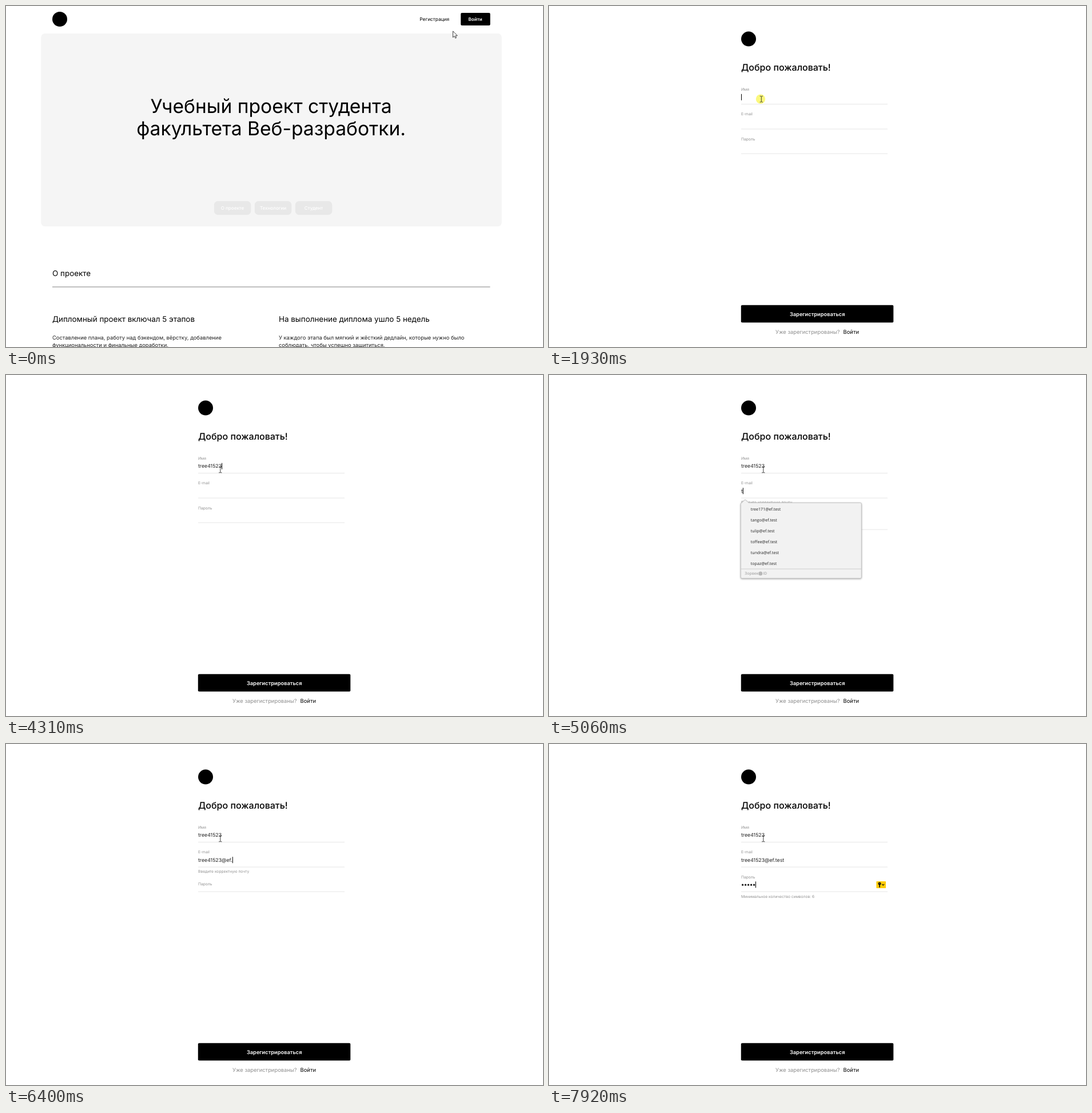
An HTML page that plays this animation: 939 px wide and 596 px high, repeating every 8000 ms.

```html
<!DOCTYPE html>
<html lang="ru">
<head>
<meta charset="utf-8">
<title>Регистрация</title>
<style>
html, body { margin: 0; width: 100%; height: 100%; overflow: hidden; background: #fff; }
svg { display: block; width: 939px; height: 596px; }
text { font-family: Inter, sans-serif; font-optical-sizing: none; text-rendering: geometricPrecision; white-space: pre; }
.mid { text-anchor: middle; }
.hero { font-size: 33.6px; }
.head { font-size: 13.43px; }
.body { font-size: 9.4px; fill: #222; }
.nav { font-size: 8.06px; font-weight: 500; }
.link { font-size: 8.3px; }
.title { font-size: 16px; font-weight: 500; }
.label { font-size: 6.7px; fill: #919191; }
.value { font-size: 8.73px; fill: #222; }
.action { font-size: 9.25px; font-weight: 600; }
.note { font-size: 9.4px; }
.menu { font: 7.1px "Open Sans", "Noto Sans", sans-serif; fill: #222; }
.brand { font: 600 6.7px "Open Sans", "Noto Sans", sans-serif; fill: #ababab; }
</style>
</head>
<body>
<svg id="stage" viewBox="0 0 939 596"></svg>
<script>
const stage = document.getElementById('stage');
const LOOP = 8000;
const NAME = 'tree41523';
const EMAIL = 'tree41523@ef.test';

const rect = (x, y, w, h, fill, r = 0, extra = '') =>
  `<rect x="${x}" y="${y}" width="${w}" height="${h}" rx="${r}" fill="${fill}" ${extra}/>`;
const text = (x, y, cls, str, extra = '') =>
  `<text x="${x}" y="${y}" class="${cls}" ${extra}>${str}</text>`;
const circle = (x, y, r, fill) => `<circle cx="${x}" cy="${y}" r="${r}" fill="${fill}"/>`;

function tab(x, label) {
  return rect(x, 341, 64.5, 24, '#e8e8e8', 6.5) +
    text(x + 32.2, 356, 'nav mid', label, 'fill="#fff"');
}

function column(x, head, lines) {
  return text(x, 552, 'head', head) +
    lines.map((line, i) => text(x, 582.6 + i * 13.4, 'body', line)).join('');
}

const home = `<g id="home">
  ${circle(94, 23, 13, '#000')}
  ${text(749.2, 25.6, 'link mid', 'Регистрация')}
  ${rect(795.2, 11.9, 51.5, 22, '#000', 2)}
  ${text(820.6, 25.6, 'nav mid', 'Войти', 'fill="#fff" font-weight="600" style="font-weight:600"')}
  ${rect(61.3, 48, 805.5, 337.3, '#f5f5f5', 6.7)}
  ${text(463.6, 187, 'hero mid', 'Учебный проект студента')}
  ${text(463.6, 226, 'hero mid', 'факультета Веб-разработки.')}
  ${tab(363.8, 'О проекте')}${tab(434.8, 'Технологии')}${tab(505.8, 'Студент')}
  ${text(81, 472, 'head', 'О проекте')}
  ${rect(81, 490.5, 765.5, 1, '#808080')}
  ${column(81, 'Дипломный проект включал 5 этапов', [
    'Составление плана, работу над бэкендом, вёрстку, добавление',
    'функциональности и финальные доработки.'])}
  ${column(477, 'На выполнение диплома ушло 5 недель', [
    'У каждого этапа был мягкий и жёсткий дедлайн, которые нужно было',
    'соблюдать, чтобы успешно защититься.'])}
</g>`;

const form = `<g id="form">
  ${circle(349, 57.6, 13, '#000')}
  ${text(336, 113, 'title', 'Добро пожаловать!')}
  ${text(336, 148.4, 'label', 'Имя')}
  ${text(336, 191.4, 'label', 'E-mail', 'id="emailLabel"')}
  ${text(336, 235, 'label', 'Пароль', 'id="passLabel"')}
  ${[171, 214.5, 257.6].map((y, i) => rect(336, y, 256, 1, '#e6e6e6', 0, `id="line${i}"`)).join('')}
  ${text(336, 162.4, 'value', '', 'id="name"')}
  ${text(336, 206, 'value', '', 'id="email"')}
  <g id="dots"></g>
  ${text(336, 0, 'label', '', 'id="error"')}
  ${rect(336, 0, 1, 11, '#000', 0, 'id="caret"')}
  <g id="key">
    ${rect(572.4, 240, 16.6, 12, '#fc0', .8)}
    ${circle(578, 244, 2.5, '#111')}${rect(577.2, 245, 1.7, 5.6, '#111')}${circle(578, 243.3, .6, '#fc0')}
    <path d="M582.2 244.9l2 2 2-2" fill="none" stroke="#111" stroke-width="1.1"/>
  </g>
  <g id="menu"></g>
  ${rect(335.8, 522.7, 266.5, 30.6, '#000', 2)}
  ${text(469.2, 541.5, 'action mid', 'Зарегистрироваться', 'fill="#fff"')}
  ${text(396, 573.3, 'note', 'Уже зарегистрированы?', 'fill="#8f8f8f"')}
  ${text(514.6, 573.3, 'note', 'Войти')}
</g>`;

const cursors = `<g id="halo">${circle(0, 0, 8.2, '#fbf87d')}</g>
<g id="pointer" fill="#fff" stroke="#111" stroke-width=".8" stroke-linejoin="round">
  <path id="arrow" d="M0 .4V11.4L2.6 9 4.3 12.8 6 12 4.4 8.4H7.8Z"/>
  <path id="hand" d="M-1 1Q0-.6 1 1V5L5.5 6Q6.5 6.4 6.4 8L5.4 13H-1L-4.4 8.4Q-4.2 7-2.8 7.6L-1 9Z"/>
  <path id="ibeam" fill="none" stroke-linejoin="miter" d="M-2.6-5H-.8L0-4.3.8-5H2.6M0-4.3V4.6M-2.6 5.3H-.8L0 4.6.8 5.3H2.6"/>
</g>`;

stage.innerHTML = home + form + cursors;
const ui = {};
stage.querySelectorAll('[id]').forEach(node => ui[node.id] = node);

const show = (node, on) => node.setAttribute('visibility', on ? 'visible' : 'hidden');
const place = (node, x, y) => node.setAttribute('transform', `translate(${x} ${y})`);
const between = (t, a, b) => t >= a && t < b;
const countPast = (times, t) => times.filter(v => t >= v).length;

// Rounded drop-down with a small tip; rows sit above the service footer.
function popup(x, y, width, tip, rows) {
  const divider = y + 20.3 + (rows.length - 1) * 19;
  const bottom = divider + 16.7;
  const right = x + width;
  const shape = `M${x + 2} ${y}H${tip - 6}L${tip} ${y - 5.5}L${tip + 6} ${y}H${right - 2}q2 0 2 2` +
    `V${bottom - 2}q0 2-2 2H${x + 2}q-2 0-2-2V${y + 2}q0-2 2-2Z`;
  return `<path d="${shape}" fill="#f2f2f2" stroke="#b9b9b9" stroke-width=".8" style="filter:drop-shadow(0 1px 1.5px #0005)"/>` +
    rows.map((row, i) => text(x + 17.5, y + 13.4 + i * 19, 'menu', row)).join('') +
    rect(x, divider, width, .8, '#c4c4c4') +
    text(x + 7, divider + 10.8, 'brand', 'Зорвек') +
    circle(x + 34.5, divider + 8.4, 3.5, '#b8b8b8') +
    text(x + 39, divider + 10.8, 'brand', 'ID');
}

const suggestions = ['tree171@ef.test', 'tango@ef.test', 'tulip@ef.test', 'toffee@ef.test', 'tundra@ef.test', 'topaz@ef.test'];
const longMenu = popup(335.3, 223.3, 211, 343, suggestions);
const shortMenu = popup(335.3, 223.3, 211, 343, suggestions.slice(0, 1));
const saveMenu = y => popup(375.3, y, 215.3, 582, ['Сохранить в браузере']) +
  rect(379.6, y + 6.3, 9, 8.8, '#fc0', 1) +
  `<path d="M381.8 ${y + 10.6}l1.8 1.8 3-3.5" fill="none" stroke="#222" stroke-width="1.1"/>`;
const saveTop = saveMenu(267.3);
const saveLow = saveMenu(278.3);

const nameKeys = [2990, 3130, 3320, 3590, 3870, 3940, 4070, 4210, 4310];
const emailKeys = [4920, 5130, 5200, 5330, 5590, 5660, 5800, 5870, 5930, 6070, 6200, 6270, 6400, 6470, 6540, 6670, 6810];
const passKeys = [7260, 7520, 7650, 7790, 7920];

function menuAt(t) {
  if (between(t, 4990, 5330)) return longMenu;
  if (between(t, 5330, 5730)) return shortMenu;
  if (between(t, 7070, 7260)) return saveTop;
  if (between(t, 7260, 7590)) return saveLow;
  return '';
}

// [time, x, y] stops of the mouse
const path = [[0, 781.5, 43.5], [350, 749.6, 21.6], [770, 749.6, 21.6], [1120, 318, 190],
  [1190, 318, 190], [1470, 371.3, 162.6]];

function mouseAt(time) {
  if (time >= 2000) return [374.8, 165.4];
  const t = Math.floor(time / 70) * 70;
  const i = path.findIndex(stop => stop[0] > t);
  if (i < 0) return path[path.length - 1].slice(1);
  const [t0, x0, y0] = path[i - 1], [t1, x1, y1] = path[i];
  const u = (t - t0) / (t1 - t0), k = u * u * (3 - 2 * u);
  return [x0 + (x1 - x0) * k, y0 + (y1 - y0) * k];
}

let lastMenu = '';

function render(t) {
  const onHome = t < 770;
  show(ui.home, onHome);
  ui.form.style.display = onHome ? 'none' : '';

  const nameCount = countPast(nameKeys, t);
  const emailCount = countPast(emailKeys, t);
  const passCount = countPast(passKeys, t);
  ui.name.textContent = NAME.slice(0, nameCount);
  ui.email.textContent = EMAIL.slice(0, emailCount);
  ui.dots.innerHTML = Array.from({ length: passCount }, (_, i) =>
    circle(338.6 + i * 5, 246.2, 1.6, '#111')).join('');

  const nameError = between(t, nameKeys[0], nameKeys[1]);
  const emailError = between(t, emailKeys[0], emailKeys[16]);
  const passError = passCount > 0;
  ui.error.textContent = nameError ? 'Минимальное количество символов: 2'
    : emailError ? 'Введите корректную почту'
    : passError ? 'Минимальное количество символов: 6' : '';
  ui.error.setAttribute('y', nameError ? 181.6 : emailError ? 225.2 : 268.6);
  place(ui.emailLabel, 0, nameError ? 12 : 0);
  place(ui.passLabel, 0, nameError || emailError ? 12 : 0);
  place(ui.line2, 0, between(t, 4990, 5730) ? 12 : 0);

  const menu = menuAt(t);
  if (menu !== lastMenu) ui.menu.innerHTML = lastMenu = menu;
  show(ui.key, !onHome && t >= 7070);

  const width = t < 4710 ? ui.name.getComputedTextLength()
    : t < 7070 ? ui.email.getComputedTextLength() : passCount * 5;
  ui.caret.setAttribute('x', 336 + width);
  ui.caret.setAttribute('y', t < 4710 ? 153.8 : t < 7070 ? 197.2 : 240.3);
  show(ui.caret, t >= 1930 && !between(t, 2460, 2990));

  const [x, y] = mouseAt(t);
  place(ui.pointer, x, y);
  place(ui.halo, t < 1500 ? 749 : 370, t < 1500 ? 22 : 162.6);
  show(ui.halo, between(t, 680, 840) || between(t, 1930, 2000));
  show(ui.hand, between(t, 350, 770));
  show(ui.ibeam, t >= 1530);
  show(ui.arrow, t < 350 || between(t, 770, 1530));
}

const start = performance.now();
function tick() {
  render((performance.now() - start) % LOOP);
  requestAnimationFrame(tick);
}
tick();
</script>
</body>
</html>
```
